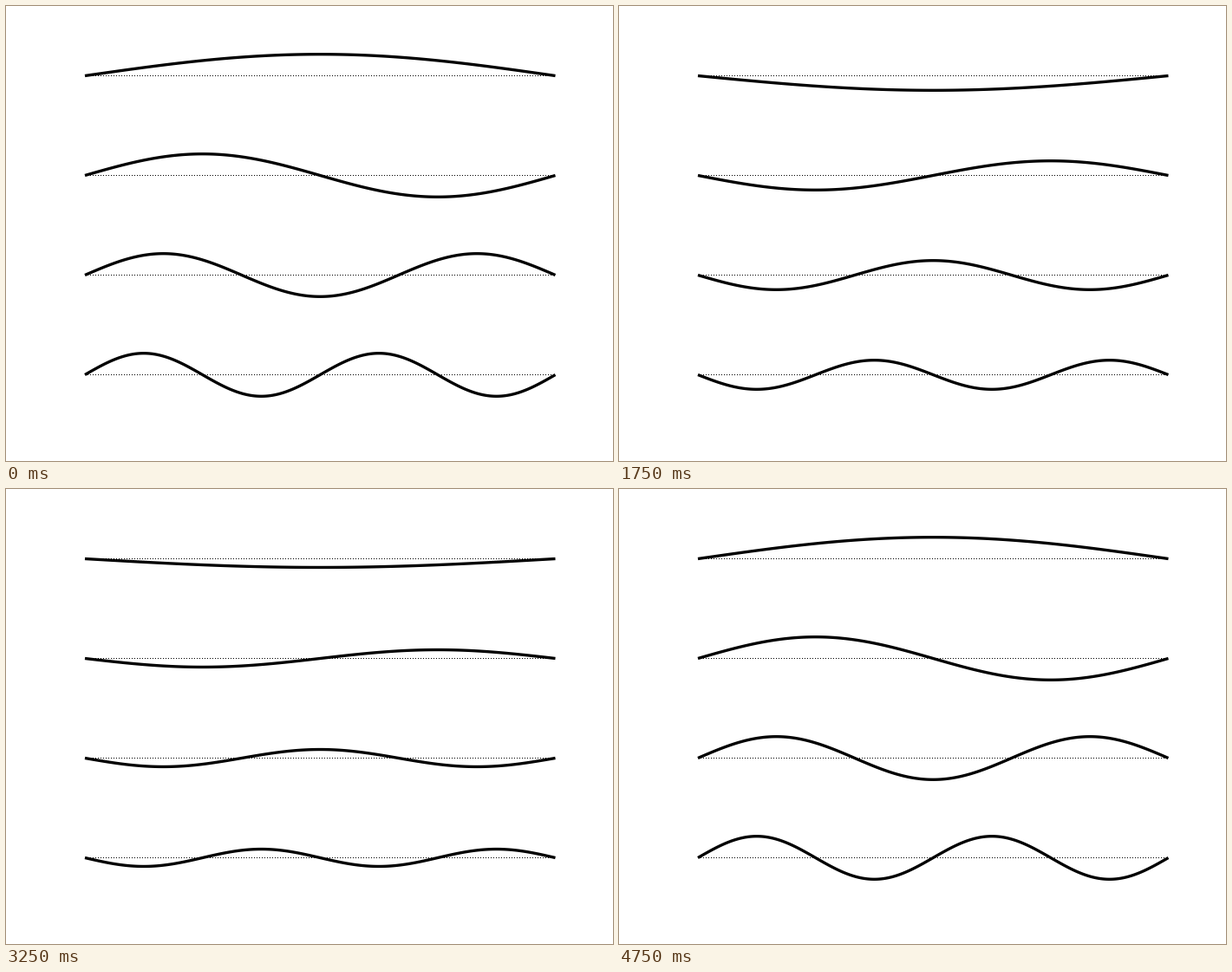
A matplotlib script that plays this animation: 700x525 px, repeating every 5000 ms.

```python
import numpy as np
import matplotlib.pyplot as plt
from matplotlib.animation import FuncAnimation

WIDTH, HEIGHT, DPI = 700, 525, 100
FRAMES, INTERVAL = 20, 250
LEFT, RIGHT = 91, 633.5
FIRST_ROW, ROW_STEP = 80.5, 115
AMPLITUDE = 24.8
MODES = (1, 2, 3, 4)

plt.rcParams["path.simplify"] = False


def px(size):
    """Convert pixels to points."""
    return size * 72 / DPI


fig = plt.figure(figsize=(WIDTH / DPI, HEIGHT / DPI), dpi=DPI, facecolor="white")
ax = fig.add_axes([0, 0, 1, 1])
ax.set_xlim(0, WIDTH)
ax.set_ylim(HEIGHT, 0)
ax.axis("off")

s = np.linspace(0, 1, 301)
x = LEFT + (RIGHT - LEFT) * s
rows = [FIRST_ROW + ROW_STEP * i for i in range(len(MODES))]

waves = []
for row in rows:
    ax.plot([LEFT, RIGHT], [row, row], color="black", lw=px(1),
            dashes=(1, 2), dash_capstyle="butt", snap=False)
    wave, = ax.plot(x, np.full_like(x, row), color="black", lw=px(10 / 3),
                    solid_capstyle="butt", solid_joinstyle="round", snap=False)
    waves.append(wave)


def update(frame):
    # The first and last frames share the same phase.
    swing = AMPLITUDE * np.cos(2 * np.pi * frame / (FRAMES - 1))
    for wave, row, mode in zip(waves, rows, MODES):
        wave.set_ydata(row - swing * np.sin(mode * np.pi * s))
    return waves


anim = FuncAnimation(fig, update, frames=FRAMES, interval=INTERVAL,
                     repeat=True, repeat_delay=0, blit=False)
plt.show()
```
